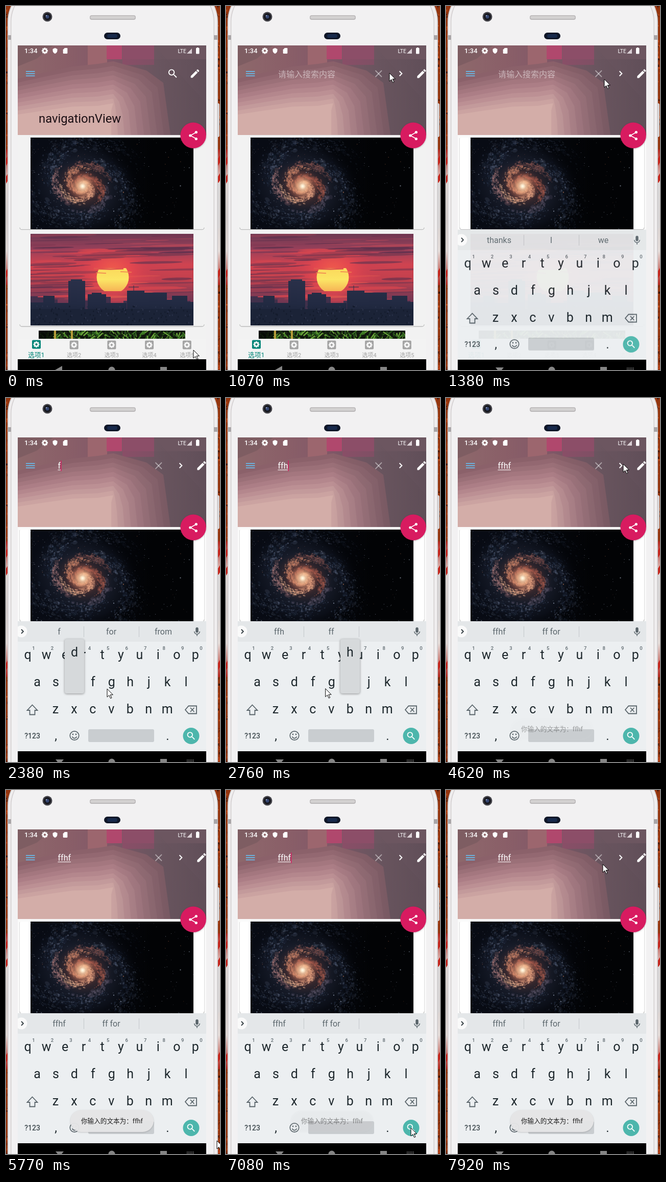
Recreate the animation shown at these times as an HTML page with a canvas. Size 419x711 px, loop 8 s.

```html
<!DOCTYPE html>
<html lang="zh">
<head>
<meta charset="utf-8">
<title>navigationView</title>
<style>
html, body { margin: 0; width: 100%; height: 100%; overflow: hidden; background: #8d3a14; }
canvas { display: block; }
</style>
</head>
<body>
<canvas id="stage" width="419" height="711"></canvas>
<script>
const W = 419, H = 711, LOOP = 8000, STEP = 1000 / 13, TAU = Math.PI * 2;
const FONT = 'Roboto, "Noto Sans CJK SC", "Noto Sans CJK", sans-serif';
const view = document.getElementById('stage').getContext('2d');
let g = view;

// ---------- helpers ----------
function rng(seed) {
  return () => {
    seed = (seed * 1664525 + 1013904223) >>> 0;
    return seed / 4294967296;
  };
}
function rect(x, y, w, h, c) { g.fillStyle = c; g.fillRect(x, y, w, h); }
function round(x, y, w, h, r, c) {
  g.fillStyle = c; g.beginPath(); g.roundRect(x, y, w, h, r); g.fill();
}
function disc(x, y, r, c) {
  g.fillStyle = c; g.beginPath(); g.arc(x, y, r, 0, TAU); g.fill();
}
function oval(x, y, rx, ry, c, a = 0) {
  g.fillStyle = c; g.beginPath(); g.ellipse(x, y, rx, ry, a, 0, TAU); g.fill();
}
function poly(pts, c) {
  g.fillStyle = c; g.beginPath();
  for (let i = 0; i < pts.length; i += 2) g.lineTo(pts[i], pts[i + 1]);
  g.closePath(); g.fill();
}
function line(pts, c, w = 1) {
  g.strokeStyle = c; g.lineWidth = w; g.beginPath();
  for (let i = 0; i < pts.length; i += 2) g.lineTo(pts[i], pts[i + 1]);
  g.stroke();
}
function ring(x, y, r, c, w) {
  g.strokeStyle = c; g.lineWidth = w;
  g.beginPath(); g.arc(x, y, r, 0, TAU); g.stroke();
}
function text(s, x, y, size, c, align = 'left', weight = 400) {
  g.font = `${weight} ${size}px ${FONT}`;
  g.textAlign = align; g.fillStyle = c; g.fillText(s, x, y);
}
function ramp(x0, y0, x1, y1, ...cols) {
  const f = g.createLinearGradient(x0, y0, x1, y1);
  cols.forEach((c, i) => f.addColorStop(i / (cols.length - 1), c));
  return f;
}
function glow(x, y, r, ...cols) {
  const f = g.createRadialGradient(x, y, 0, x, y, r);
  cols.forEach((c, i) => f.addColorStop(i / (cols.length - 1), c));
  return f;
}
function clip(x, y, w, h, draw) {
  g.save(); g.beginPath(); g.rect(x, y, w, h); g.clip();
  draw(); g.restore();
}
function fade(a, draw) { g.save(); g.globalAlpha *= a; draw(); g.restore(); }
function bake(draw) {
  const c = document.createElement('canvas');
  c.width = W; c.height = H;
  g = c.getContext('2d'); draw(); g = view;
  return c;
}
const mix = (a, b, k) => a + (b - a) * k;
const clamp = k => Math.max(0, Math.min(1, k));
const ease = k => k * k * (3 - 2 * k);
const rgb = (a, b, k) => `rgb(${a.map((v, i) => Math.round(mix(v, b[i], k)))})`;

// ---------- icons ----------
const SEARCH = new Path2D('M15.5 14h-.79l-.28-.27A6.47 6.47 0 0 0 16 9.5 6.5 6.5 0 1 0 9.5 16c1.61 0 3.09-.59 4.23-1.57l.27.28v.79l5 4.99L20.49 19l-4.99-5zm-6 0C7.01 14 5 11.99 5 9.5S7.01 5 9.5 5 14 7.01 14 9.5 11.99 14 9.5 14z');
const PENCIL = new Path2D('M3 17.25V21h3.75L17.81 9.94l-3.75-3.75L3 17.25zM20.71 7.04a1 1 0 0 0 0-1.41l-2.34-2.34a1 1 0 0 0-1.41 0l-1.83 1.83 3.75 3.75 1.83-1.83z');
const SHIELD = new Path2D('M12 1 3 5v6c0 5.55 3.84 10.74 9 12 5.16-1.26 9-6.45 9-12V5z');
const CARD = new Path2D('M18 2h-8L4 8v12a2 2 0 0 0 2 2h12a2 2 0 0 0 2-2V4a2 2 0 0 0-2-2z');
const ARROW = new Path2D('M0 0V16L3.8 12.5 6.6 18.6 9 17.5 6.2 11.6H11.4z');

function icon(p, x, y, size, c) {
  g.save(); g.translate(x - size / 2, y - size / 2); g.scale(size / 24, size / 24);
  g.fillStyle = c; g.fill(p, 'evenodd'); g.restore();
}
function gear(x, y, r, c, hole) {
  g.save(); g.translate(x, y);
  for (let i = 0; i < 4; i++) { rect(-r * .24, -r, r * .48, r * 2, c); g.rotate(Math.PI / 4); }
  disc(0, 0, r * .76, c); disc(0, 0, r * .36, hole); g.restore();
}
function chevron(x, y, r, c, w = 2) {
  line([x - r / 2, y - r, x + r / 2, y, x - r / 2, y + r], c, w);
}

// ---------- still artwork ----------
function wall() {
  const rnd = rng(7);
  rect(0, 0, W, H, '#94360f');
  for (let i = 0; i < 700; i++) {
    const x = rnd() < .5 ? rnd() * 16 : 403 + rnd() * 16;
    rect(x, rnd() * H, 1 + rnd() * 3, 1 + rnd() * 4, ['#3c1509', '#b8451a', '#7a2b0d', '#c9531f'][i % 4]);
  }
  for (const x of [0, 415]) {
    rect(x, 280, 5, 265, ramp(0, 280, 0, 545, '#b3261c', '#e6dedb', '#d9d2d0', '#e6dedb', '#b3261c'));
    for (const y of [290, 325, 510]) poly([x, y + 8, x + 5, y, x + 5, y + 14, x, y + 22], '#c4251c');
  }
}
function phone() {
  wall();
  round(410, 190, 8, 66, 3, '#d9d7d8');
  round(410, 345, 8, 90, 3, '#d9d7d8');
  round(3, -40, 412, 850, 70, '#c9c5c6');
  round(4.5, -39, 409, 850, 69, '#f0eeef');
  round(9, -36, 399, 850, 66, '#d2cecf');
  round(10.5, -35, 396, 850, 65, '#f2f1f2');
  rect(4, 57, 6, 9, '#a9a5a7'); rect(407, 57, 7, 9, '#a9a5a7');
  disc(81, 21, 9.5, '#45444a'); disc(81, 21, 7, '#15161d'); disc(81, 21, 3.5, '#34446f');
  disc(79, 19, 1.3, '#8d9cc1');
  round(164, 18, 90, 9, 4, '#bab7b8'); round(165.5, 19.5, 87, 5.5, 2.7, '#d3d1d1');
  round(192, 52, 32, 13, 6.5, '#0e1627'); round(198, 55, 20, 7, 3.5, '#17294b');
}
function bandColor(k) {
  const outer = [139, 97, 106], mid = [176, 130, 138], inner = [211, 173, 168];
  return k < .5 ? rgb(outer, mid, k * 2) : rgb(mid, inner, k * 2 - 1);
}
function banner() {
  clip(23, 77, 369, 175, () => {
    rect(23, 77, 369, 175, ramp(23, 0, 392, 0, '#8d686b', '#8a5f68', '#805767', '#6b5660', '#655159'));
    poly([23, 77, 92, 77, 60, 103, 23, 118], '#7e5d62');
    rect(160, 77, 38, 46, '#9c666e');
    rect(228, 77, 62, 38, '#8c4e68');
    rect(197, 77, 30, 27, '#b0486d');
    poly([290, 77, 392, 77, 392, 190, 330, 122], '#6c5660');
    const bands = 10;
    for (let i = 0; i < bands; i++) {
      const k = i / (bands - 1), top = mix(108, 190, k), side = mix(322, 206, k);
      const left = mix(142, 212, k), bend = mix(150, 232, k);
      poly([23, left, 75, mix(left, top, .35), 130, mix(left, top, .7), 180, top + 5, 210, top,
        mix(275, 206, k), mix(126, 204, k), mix(308, 206, k), bend, side, 252, 23, 252], bandColor(k));
    }
    rect(205, 104, 187, 148, ramp(205, 0, 392, 0, 'rgba(100,82,92,0)', 'rgba(100,82,92,.35)', 'rgba(94,77,87,.85)'));
  });
}
function status() {
  text('1:34', 36, 92, 13, '#fff', 'left', 500);
  gear(76, 87.5, 6, '#fff', '#8d686b');
  icon(SHIELD, 96, 87.5, 12, '#fff');
  icon(CARD, 116, 87.5, 13, '#fff');
  text('LTE', 336.5, 91.5, 10.5, '#fff');
  poly([354, 93, 364, 93, 364, 83], '#d9cfd4');
  round(372, 82, 6.5, 11.5, 1, '#fff'); rect(373.7, 81, 3, 2, '#fff');
  for (const y of [127, 131.3, 135.6]) rect(39, y, 17.5, 1.7, '#67bdee');
}
function galaxy() {
  clip(48, 257, 319, 179, () => {
    const rnd = rng(42);
    rect(48, 257, 319, 179, ramp(48, 0, 367, 0, '#080b14', '#080b13', '#04060b', '#020305', '#020305'));
    g.save(); g.translate(150, 352); g.rotate(.35); g.scale(1, .84);
    disc(0, 0, 115, glow(0, 0, 115, 'rgba(150,88,70,.8)', 'rgba(92,60,62,.65)', 'rgba(38,44,62,.5)', 'rgba(24,30,46,.35)', 'rgba(5,7,13,0)'));
    for (let i = 0; i < 3400; i++) {
      const r = 8 + 130 * Math.pow(rnd(), .85);
      const a = Math.log(r / 8) * 2.5 + (i % 3) * TAU / 3 + (rnd() + rnd() - 1) * .85;
      const tone = r < 46 ? ['#c98368', '#9c5549', '#e0a888'][i % 3]
        : r < 62 ? ['#8a5752', '#5b5467', '#a8797a'][i % 3]
        : ['#3c4a64', '#28354c', '#68748c', '#151c2b'][i % 4];
      const s = i % 7 ? .8 + rnd() * 1.6 : 2 + rnd() * 4;
      g.globalAlpha = (1 - r / 160) * (s > 2.5 ? .35 : .3 + rnd() * .6);
      oval(Math.cos(a) * r, Math.sin(a) * r, s, s * .7, tone, a + 1.2);
    }
    g.restore();
    disc(150, 352, 32, glow(150, 352, 32, '#fff0d2', 'rgba(242,180,138,.75)', 'rgba(205,120,94,.3)', 'rgba(150,70,60,0)'));
    disc(150, 352, 6, glow(150, 352, 6, '#fffbea', 'rgba(255,236,200,0)'));
    for (let i = 0; i < 280; i++) {
      g.globalAlpha = .25 + rnd() * .6;
      const s = rnd() < .08 ? 1.8 : .9;
      rect(48 + 319 * Math.pow(rnd(), 1.3), 257 + rnd() * 179, s, s, i % 9 ? '#9ba5ba' : '#e58c62');
    }
  });
}
function sunset() {
  clip(48, 445, 319, 179, () => {
    const rnd = rng(19);
    rect(48, 445, 319, 179, ramp(0, 445, 0, 624, '#6d3a52', '#98405a', '#cf4350', '#c2404d', '#833a53', '#5d3350', '#48304c'));
    rect(70, 475, 280, 110, glow(209, 522, 110, '#f2604c', 'rgba(232,72,78,.8)', 'rgba(205,62,80,.35)', 'rgba(190,60,80,0)'));
    for (let i = 0; i < 100; i++) {
      const y = 447 + rnd() * 128, x = 48 + rnd() * 319;
      const near = Math.abs(x - 209) < 60 && y > 500;
      g.globalAlpha = near ? .3 : .35 + rnd() * .45;
      oval(x, y, 20 + rnd() * 65, .8 + rnd() * 2.2,
        y < 475 ? ['#5b304c', '#833a54', '#b04659'][i % 3]
        : near ? ['#f0654f', '#d8464f'][i % 2]
        : ['#d8464f', '#592f4c', '#71364f'][i % 3], -.02);
    }
    g.globalAlpha = 1;
    clip(170, 512, 80, 45, () => disc(209, 530, 31.5, ramp(0, 512, 0, 557, '#fbd95c', '#fce565', '#f6b455')));
    line([172, 513, 205, 514, 230, 513], '#e0554f', 3);
    line([176, 521, 196, 522], '#ef7c50', 1.5); line([224, 519, 246, 520], '#ef7c50', 1.5);
    for (let x = 48; x < 367; x += 13) rect(x, 566 + rnd() * 22, 14, 70, '#41304b');
    const tower = ramp(0, 537, 0, 624, '#2a3049', '#222a42', '#161e31');
    for (const [x, y, w] of [[48, 579, 26], [73, 566, 22], [94, 580, 30], [122, 537, 33], [160, 563, 36],
      [194, 580, 42], [237, 556, 34], [268, 560, 47], [313, 574, 18], [325, 566, 30], [353, 578, 14]])
      rect(x, y, w, 624 - y, tower);
    rect(127, 534, 22, 4, tower); rect(168, 560, 19, 4, tower);
    rect(48, 592, 319, 32, '#1b2337');
    line([250, 556, 250, 546], '#2a3049'); line([240, 549, 260, 549], '#2a3049');
    for (let i = 0; i < 170; i++)
      rect(50 + rnd() * 314, 584 + rnd() * 38, 2, 3, i % 3 ? '#141b2c' : '#2a3149');
  });
}
function bamboo() {
  clip(64, 634, 287, 16, () => {
    const rnd = rng(5);
    rect(64, 634, 287, 16, '#10180d');
    for (let i = 0; i < 210; i++) {
      const x = 64 + rnd() * 287, y = 630 + rnd() * 22, d = (rnd() - .5) * 24;
      line([x, y, x + d, y + 6 + rnd() * 5], ['#3f7d25', '#28541c', '#6ba53a', '#16270f'][i % 4], 1 + rnd() * 2);
    }
    rect(64, 634, 28, 16, 'rgba(4,8,4,.8)');
    for (const x of [94, 127]) rect(x, 634, 4, 16, '#b89b39');
  });
}
function pane(y, bottom, c) {
  round(27, y, 361, bottom - y, 4, c);
  g.strokeStyle = '#bcbcbc'; g.lineWidth = 1.3; g.beginPath();
  g.moveTo(27, bottom - 4); g.arcTo(27, bottom, 32, bottom, 4);
  g.arcTo(388, bottom, 388, bottom - 4, 4); g.stroke();
}
function page(white) {
  rect(23, 252, 369, 438, white ? '#fafafa' : '#f2f2f2');
  const c = white ? '#fff' : '#f2f2f2';
  pane(257, 436.7, c); pane(445, 626, c);
  if (white) { rect(26, 258, 1, 176, '#dcdcdc'); rect(388, 258, 1, 176, '#dcdcdc'); }
  galaxy(); sunset(); bamboo();
  rect(23, 650, 369, 40, '#f3f3f3');
  for (let i = 0; i < 5; i++) {
    const x = 59.5 + i * 73.7, y = i ? 662 : 661, c = i ? '#a3a3a3' : '#008577';
    round(x - 8.5, y - 8.5, 17, 17, 2, c);
    gear(x, y, 6, '#f6f6f6', c);
    text('选项' + (i + 1), x, 686, i ? 11 : 12.6, c, 'center');
  }
  banner(); status();
}
function fab() {
  g.save(); g.shadowColor = 'rgba(0,0,0,.25)'; g.shadowBlur = 3; g.shadowOffsetY = 1;
  disc(366.7, 252.7, 25.2, '#d81b60'); g.restore();
  line([372.3, 246.7, 361, 253, 372.3, 259.3], '#fff', 1.6);
  disc(372.3, 246.5, 2.6, '#fff'); disc(360.8, 253, 2.6, '#fff'); disc(372.3, 259.5, 2.6, '#fff');
}

// ---------- keyboard ----------
const INK = '#1d272c', GREY = '#59646a';
function letters(row, x, y) {
  [...row].forEach((ch, i) => text(ch, x + i * 36.45, y, 25, INK, 'center'));
}
function keyboard() {
  rect(23, 436, 369, 40, '#e4e7e9');
  rect(23, 476, 369, 214, '#eceff1');
  g.save(); g.beginPath(); g.rect(23, 440, 30, 34); g.clip(); disc(30, 456, 11.5, '#fafafa'); g.restore();
  chevron(32, 456, 4, '#333d42', 1.8);
  rect(152, 446, 1, 21, '#c3c8cb'); rect(260, 446, 1, 21, '#c3c8cb');
  round(371.3, 448, 5.4, 10.5, 2.7, GREY);
  g.strokeStyle = GREY; g.lineWidth = 1.5; g.beginPath(); g.arc(374, 456, 5.3, 0, Math.PI); g.stroke();
  line([374, 461, 374, 465], GREY, 1.5);
  letters('qwertyuiop', 42.7, 510);
  [...'1234567890'].forEach((d, i) => text(d, 54 + i * 36.45, 492, 9.5, '#5d686e', 'center', 500));
  letters('asdfghjkl', 61, 563);
  letters('zxcvbnm', 97, 616);
  g.strokeStyle = GREY; g.lineWidth = 1.8;
  g.stroke(new Path2D('M51.5 599.5 61.5 610H56.5V618.5H46.5V610H41.5Z'));
  g.stroke(new Path2D('M357.5 601.5H373V616.5H357.5L351 609Z'));
  line([361, 605, 368.5, 613], GREY, 1.8); line([368.5, 605, 361, 613], GREY, 1.8);
  text('?123', 51.5, 665, 14, '#3e494e', 'center', 500);
  text(',', 97.5, 668, 24, INK, 'center'); text('.', 316.5, 668, 24, INK, 'center');
  ring(134, 659.5, 8.7, GREY, 1.7);
  disc(131, 657, 1.4, GREY); disc(137, 657, 1.4, GREY);
  g.beginPath(); g.arc(134, 660, 4.6, .3, Math.PI - .3); g.stroke();
  round(161, 647, 129, 25, 3, '#c9cdd0');
  disc(362.5, 660, 16, '#4db6ac'); icon(SEARCH, 362.5, 660, 21, '#fff');
}
function hints(words) {
  words.forEach((w, i) => text(w, 104 + i * 102, 462, 16, '#5b666c', 'center'));
}
function popup(ch, x) {
  g.save(); g.shadowColor = 'rgba(0,0,0,.4)'; g.shadowBlur = 4; g.shadowOffsetY = 1;
  round(x - 19, 471, 38, 106, 4, '#d6d9db'); g.restore();
  text(ch, x, 505, 25, INK, 'center');
}
function navBar(typing) {
  rect(23, 690, 369, 21, '#000');
  const c = '#858585';
  poly(typing ? [97, 706, 113, 706, 105, 716] : [96, 711, 110, 703, 110, 719], c);
  disc(207, 711, 6.5, c); rect(302, 705, 13, 8, c);
  if (typing) for (let i = 0; i < 10; i++) rect(354 + (i % 5) * 3, i < 5 ? 706.5 : 709.5, 1.6, 1.6, c);
}

// ---------- timeline ----------
const MOUSE = [[0, 367, 672], [70, 367, 672], [610, 320, 131], [1230, 320, 131], [1380, 310, 143],
  [2070, 165, 552], [2380, 198, 568], [2600, 200, 574], [2920, 190, 562], [3450, 347, 129],
  [3530, 354, 121], [3700, 354, 121], [3850, 347, 129], [4850, 347, 129], [5540, 410, 683],
  [5770, 413, 685], [6000, 413, 685], [6460, 362, 660], [7400, 362, 660], [7540, 337, 572], [7920, 307, 145], [8000, 307, 145]];
const TYPED = [
  [1300, '', ['thanks', 'I', 'we']],
  [2060, 'f', ['f', 'for', 'from']],
  [2530, 'ff', ['ff', 'off', 'for']],
  [2680, 'ffh', ['ffh', 'ff', '']],
  [2840, 'ffhf', ['ffhf', 'ff for', '']]];
const PRESSED = [[2060, 'f', 170], [2300, 'd', 134], [2530, 'f', 170], [2680, 'h', 243], [2840, 'f', 170]];

function pointer(t) {
  let i = 1;
  while (i < MOUSE.length - 1 && MOUSE[i][0] < t) i++;
  const [t0, x0, y0] = MOUSE[i - 1], [t1, x1, y1] = MOUSE[i];
  let k = clamp((t - t0) / (t1 - t0));
  if (t1 - t0 > 450) k = ease(k);
  g.save(); g.translate(mix(x0, x1, k), mix(y0, y1, k));
  g.fillStyle = '#fff'; g.fill(ARROW);
  g.strokeStyle = '#000'; g.lineWidth = 1; g.stroke(ARROW); g.restore();
}
function ripple(t, start, end, x, y, r) {
  if (t < start || t > end) return;
  const k = (t - start) / (end - start);
  disc(x, y, r * (.6 + .4 * k), `rgba(255,255,255,${.28 * (1 - k * .7)})`);
}
function caretOn(t) {
  if (t < 3380) return true;
  return t > 3900 && (t + 960) % 1000 < 500;
}
function toolbar(t, entry) {
  if (t < 1050) {
    text('navigationView', 64, 228, 23.8, '#1b0f14');
    icon(SEARCH, 326.5, 132, 23, '#fff');
    icon(PENCIL, 370, 132, 22, '#fff');
    ripple(t, 760, 900, 328, 131, 15);
    return;
  }
  const word = entry[1];
  if (word) {
    text(word, 101.5, 138, 16, '#fff');
    const w = g.measureText(word).width;
    rect(101.5, 140, w, 1, '#fff');
    if (caretOn(t)) rect(101.5 + w, 122, 1.4, 21, '#d81b60');
  } else text('请输入搜索内容', 102, 138.5, 16, 'rgba(255,255,255,.5)');
  const dim = 'rgba(255,255,255,.45)';
  line([292.5, 126, 305, 138.5], dim, 1.8); line([305, 126, 292.5, 138.5], dim, 1.8);
  chevron(342, 132, 4.7, '#fff');
  ripple(t, 3680, 4090, 342, 131, 17);
  clip(23, 77, 369, 175, () => icon(PENCIL, 383, 132, 23, '#fff'));
}
function toast(t) {
  const a = t < 6800
    ? clamp((t - 4500) / 300) * clamp((6680 - t) / 160)
    : clamp((t - 6950) / 270);
  if (!a) return;
  fade(a, () => {
    g.save(); g.shadowColor = 'rgba(0,0,0,.18)'; g.shadowBlur = 3; g.shadowOffsetY = 1;
    round(126, 625, 163, 43, 21.5, `rgba(230,231,232,${.96 * a * a})`); g.restore();
    text('你输入的文本为：ffhf', 147, 651, 12.6, '#1e1e1e');
  });
}

const body = bake(phone), pages = [bake(() => page(false)), bake(() => page(true))], keys = bake(keyboard);

function render(t) {
  const typing = t >= 1290;
  const entry = TYPED.filter(e => e[0] <= t).pop() || TYPED[0];
  g.drawImage(body, 0, 0);
  g.drawImage(pages[+typing], 0, 0);
  toolbar(t, entry);
  fab();
  navBar(typing);
  if (typing) {
    const k = clamp((t - 1220) / 172);
    clip(23, 430, 369, 262, () => fade(k, () => {
      g.translate(0, 20 * (1 - k));
      g.drawImage(keys, 0, 0);
      hints(entry[2]);
    }));
    const key = PRESSED.find(p => t >= p[0] && t < p[0] + 130);
    if (key) popup(key[1], key[2]);
    toast(t);
  }
  pointer(t);
}

let begin;
function tick(now) {
  begin ??= now;
  const t = (now - begin) % LOOP;
  render(Math.floor((t + 12) / STEP) * STEP);
  requestAnimationFrame(tick);
}
render(0);
requestAnimationFrame(tick);
</script>
</body>
</html>
```
